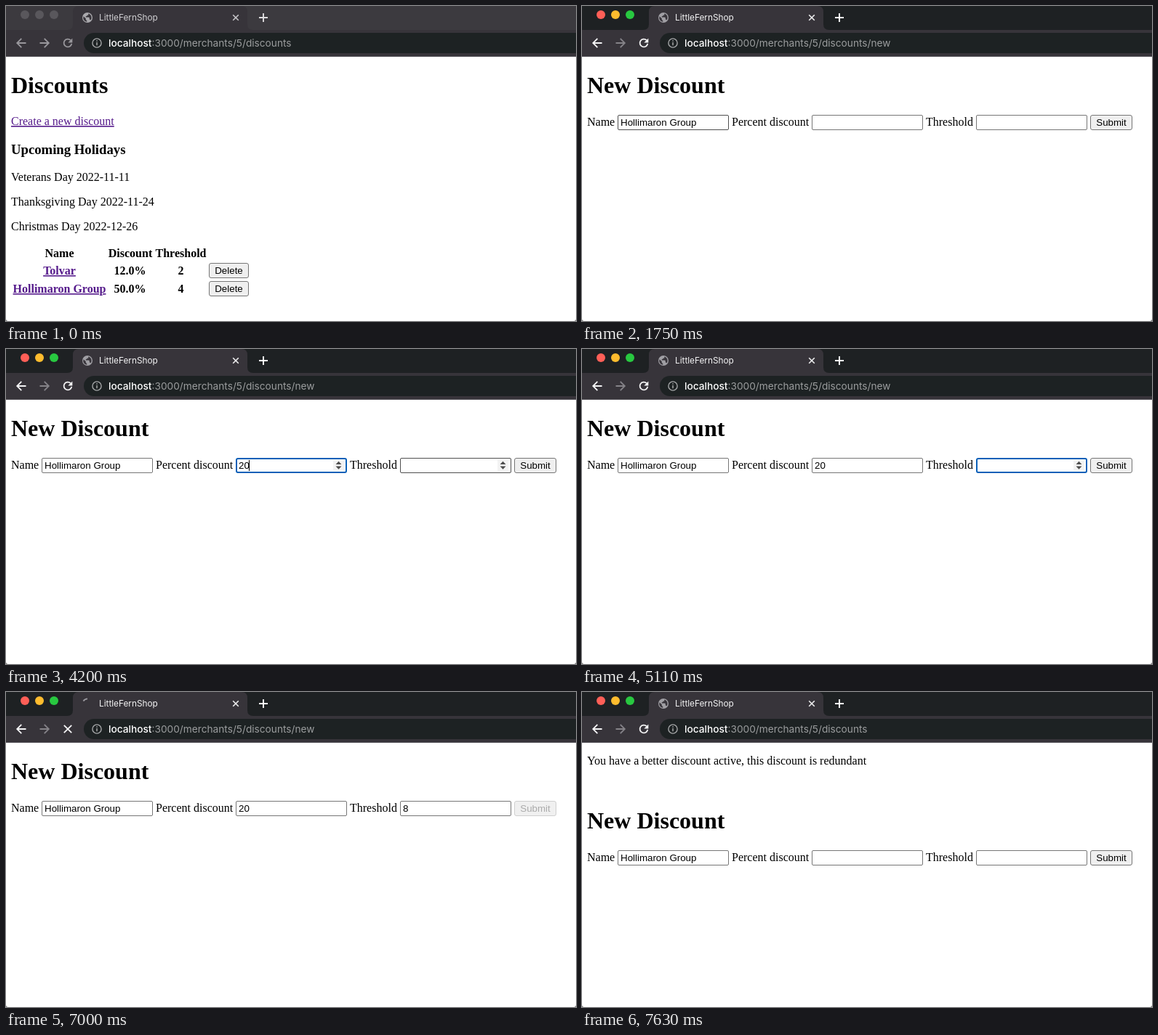
Write an HTML page that moves like this. It is 784 by 434 pixels and loops after 8 s.

```html
<!DOCTYPE html>
<html lang="en">
<head>
<meta charset="utf-8">
<title>Discounts</title>
<style>
  html, body { margin: 0; width: 100%; height: 100%; overflow: hidden; background: #fff; }
  svg { display: block; width: 100vw; height: 100vh; }
  text { white-space: pre; }
  .ui { font-family: Inter, Roboto, sans-serif; }
  .serif { font: 16px "Liberation Serif", serif; }
  .b { font-weight: bold; }
  .h1 { font-size: 32px; font-weight: bold; }
  .h3 { font-size: 18.72px; font-weight: bold; }
  .ctl { font: 13.333px "Liberation Sans", sans-serif; }
  .link { fill: #551a8b; text-decoration: underline; }
  .mid { text-anchor: middle; }
</style>
</head>
<body>
<svg id="stage" viewBox="0 0 784 434" xmlns="http://www.w3.org/2000/svg"></svg>
<script>
const LOOP = 8000, STEP = 70;
const GROUP = 'Hollimaron Group';
const T = {
  focus: 1260, click: 1680, form: 1750, leaveName: 1890,
  overPercent: 2240, percent: 2450, typePercent: 3850,
  overLimit: 4200, limit: 4550, typeLimit: 5460,
  overSpin: 6090, overSubmit: 6160, press: 6720,
  send: 6860, commit: 7420, done: 7630
};
const stage = document.getElementById('stage');

const text = (x, y, s, cls = 'serif', attr = '') =>
  `<text x="${x}" y="${y}" class="${cls}" ${attr}>${s}</text>`;
const rect = (x, y, w, h, fill, attr = '') =>
  `<rect x="${x}" y="${y}" width="${w}" height="${h}" fill="${fill}" ${attr}/>`;
const circle = (x, y, r, fill, attr = '') =>
  `<circle cx="${x}" cy="${y}" r="${r}" fill="${fill}" ${attr}/>`;
const line = (d, color, w = 1.8) =>
  `<path d="${d}" fill="none" stroke="${color}" stroke-width="${w}"/>`;

// Arc from angle a to b in degrees, clockwise from 12 o'clock
function arc(cx, cy, r, a, b, color, w) {
  const at = deg => {
    const k = (deg - 90) * Math.PI / 180;
    return `${(cx + r * Math.cos(k)).toFixed(2)} ${(cy + r * Math.sin(k)).toFixed(2)}`;
  };
  return line(`M${at(a)}A${r} ${r} 0 ${b - a > 180 ? 1 : 0} 1 ${at(b)}`, color, w);
}

function globe(color, back) {
  return circle(112, 16, 7, color) +
    `<path d="M106.6 14.2l3.2 3.1v1.6l1.5 1.4v1.5a5.6 5.6 0 0 1-4.7-7.6zM113.2 10.5a5.7 5.7 0 0 1 3.2 9
      q-.4-1.1-1.6-1.1v-2.1l-.8-.7h-4.2v-1.5h1.5v-1.4h1.9z" fill="${back}"/>`;
}

function favicon(t, color, back) {
  if (t < T.send || t >= T.done) return globe(color, back);
  if (t < T.commit) {
    const turn = 20 + 360 * (t - T.send) / 1320;
    return arc(112, 16, 6.6, -turn, -Math.max(turn - 180, 0), '#9a999f', 1.8);
  }
  const turn = 360 * (t - 7490) / 1320;
  return arc(112, 16, 6.6, 5 + turn, 232 + turn, '#7070d4', 1.8);
}

function browser(t) {
  const active = t >= T.focus, loading = t >= T.send && t < T.done;
  const bar = '#37343a', strip = active ? '#1e2123' : '#3c3a3f';
  const icon = active ? '#f4f4f5' : '#99979c';
  const next = t >= T.click ? '#858388' : icon;
  const lights = active ? ['#ff5f57', '#febc2e', '#28c840'] : Array(3).fill('#59575c');
  const path = t >= T.click && t < T.commit ? 'discounts/new' : 'discounts';
  const reload = loading
    ? line('M79.8 45.8L90.2 56.2M90.2 45.8L79.8 56.2', icon)
    : arc(85, 51, 5.4, 100, 405, icon, 1.8) + `<path d="M91.3 44.6v6h-6z" fill="${icon}"/>`;
  return rect(0, 0, 784, 34, strip) +
    lights.map((c, i) => circle(26 + 20 * i, 12, 6, c)).join('') +
    `<path d="M84 33q8 0 8-8V8q0-8 8-8H324q8 0 8 8V25q0 8 8 8z" fill="${bar}"/>` +
    rect(0, 33, 784, 37, bar) + rect(0, 69, 784, 1, '#55535a') +
    rect(107, 37, 710, 28, '#1d2223', 'rx="14"') +
    favicon(t, active ? '#a09fa4' : '#aaa9ad', bar) +
    text(128, 20, 'LittleFernShop', 'ui', `font-size="11.8" fill="${active ? '#f3f3f4' : '#cfced1'}"`) +
    line('M312.2 12.2l7.6 7.6M319.8 12.2l-7.6 7.6', active ? '#eeeeef' : '#c6c5c8', 1.6) +
    line('M348 16h12M354 10v12', active ? '#fff' : '#dddcde', 1.9) +
    line('M27.5 51H15.5M21.3 44.9L15.2 51l6.1 6.1', icon) +
    line('M46.5 51H58.5M52.7 44.9L58.8 51l-6.1 6.1', next) +
    reload +
    circle(125, 51, 6.1, 'none', 'stroke="#a4a6a7" stroke-width="1.4"') +
    line('M125 50v4.3M125 47.2v1.6', '#a4a6a7', 1.5) +
    text(141, 56, `<tspan fill="#fff" font-weight="500">localhost</tspan>:3000/merchants/5/${path}`,
      'ui', 'font-size="13.7" fill="#9b9d9e"');
}

function button(x, y, w, label, look = {}) {
  const { bg = '#efefef', edge = '#767676', ink = '#000' } = look;
  return rect(x + .5, y + .5, w - 1, 20, bg, `rx="2.5" stroke="${edge}"`) +
    text(x + w / 2, y + 15, label, 'ctl mid', `fill="${ink}"`);
}

function listPage() {
  const row = (y, name, off, min) =>
    text(73.5, y, name, 'serif b mid link') + text(170.5, y, off, 'serif b mid') +
    text(240.5, y, min, 'serif b mid') + button(279, y - 16, 55, 'Delete');
  return text(7, 120, 'Discounts', 'serif h1') +
    text(7, 164, 'Create a new discount', 'serif link') +
    text(7, 204, 'Upcoming Holidays', 'serif h3') +
    ['Veterans Day 2022-11-11', 'Thanksgiving Day 2022-11-24', 'Christmas Day 2022-12-26']
      .map((s, i) => text(7, 241 + 34 * i, s)).join('') +
    text(73.5, 346, 'Name', 'serif b mid') +
    text(171, 346, 'Discount', 'serif b mid') +
    text(240.5, 346, 'Threshold', 'serif b mid') +
    row(370, 'Tolvar', '12.0%', '2') + row(395, GROUP, '50.0%', '4');
}

function field(x, { value = '', focus, hover, spin, spinHover, caret }) {
  const edge = focus
    ? rect(x + 1, 151, 151, 19, '#fff', 'rx="2" stroke="#0b60b8" stroke-width="2"')
    : rect(x + .5, 150.5, 152, 20, '#fff', `rx="1.5" stroke="${hover ? '#4f4f4f' : '#767676'}"`);
  const mid = x + 141.5;
  const arrows = spin
    ? rect(x + 134, 153, 15, 15, '#f3f3f3') +
      (spinHover ? rect(x + 134, 160.5, 15, 7.5, '#d8d8d8') : '') +
      `<path d="M${mid - 4} 159l4-4.2 4 4.2zM${mid - 4} 161.5l4 4.2 4-4.2z" fill="#4d4d4d"/>`
    : '';
  return edge + arrows + text(x + 4, 165, value, 'ctl') +
    (caret ? rect(caret, 153, 1, 15, '#000') : '');
}

function formPage(t) {
  const within = (a, b) => t >= a && t < b;
  const done = t >= T.done;
  const percent = {
    value: t >= T.typePercent && !done ? '20' : '',
    focus: within(T.percent, T.limit),
    hover: within(T.overPercent, T.percent),
    spin: within(T.overPercent, T.limit),
    caret: within(T.percent, 2940) || within(3500, 4340) ? (t < T.typePercent ? 320 : 334) : 0
  };
  const limit = {
    value: t >= T.typeLimit && !done ? '8' : '',
    focus: within(T.limit, T.press),
    hover: within(T.overLimit, T.limit),
    spin: within(T.overLimit, T.press),
    spinHover: within(T.overSpin, T.overSubmit),
    caret: within(T.limit, 5110) || within(T.typeLimit, 5950) || within(6510, T.press)
      ? (t < T.typeLimit ? 546 : 553) : 0
  };
  let look = {};
  if (within(T.overSubmit, T.press)) look = { bg: '#e5e5e5', edge: '#4f4f4f' };
  else if (within(T.press, T.send)) look = { bg: '#f5f5f5', edge: '#8d8d8d' };
  else if (within(T.send, T.done)) look = { bg: '#f0f0f0', edge: '#cfcfcf', ink: '#aaa' };

  return (done ? text(7, 100, 'You have a better discount active, this discount is redundant') : '') +
    `<g transform="translate(0 ${done ? 68 : 0})">` +
    text(7, 120, 'New Discount', 'serif h1') +
    text(7, 165, 'Name') + field(49, { value: GROUP, hover: within(T.form, T.leaveName) }) +
    text(206, 165, 'Percent discount') + field(316, percent) +
    text(473, 165, 'Threshold') + field(542, limit) +
    button(699, 150, 58, 'Submit', look) + '</g>';
}

let shown = -1;
function draw() {
  const t = Math.floor(performance.now() % LOOP / STEP) * STEP;
  if (t !== shown) {
    shown = t;
    stage.innerHTML = rect(0, 0, 784, 434, '#fff') + browser(t) +
      (t < T.form ? listPage() : formPage(t)) +
      '<path d="M0 431.5q.3 2.2 2.5 2.5H0zM784 431.5q-.3 2.2-2.5 2.5h2.5z" fill="#777"/>';
  }
  requestAnimationFrame(draw);
}
draw();
</script>
</body>
</html>
```
